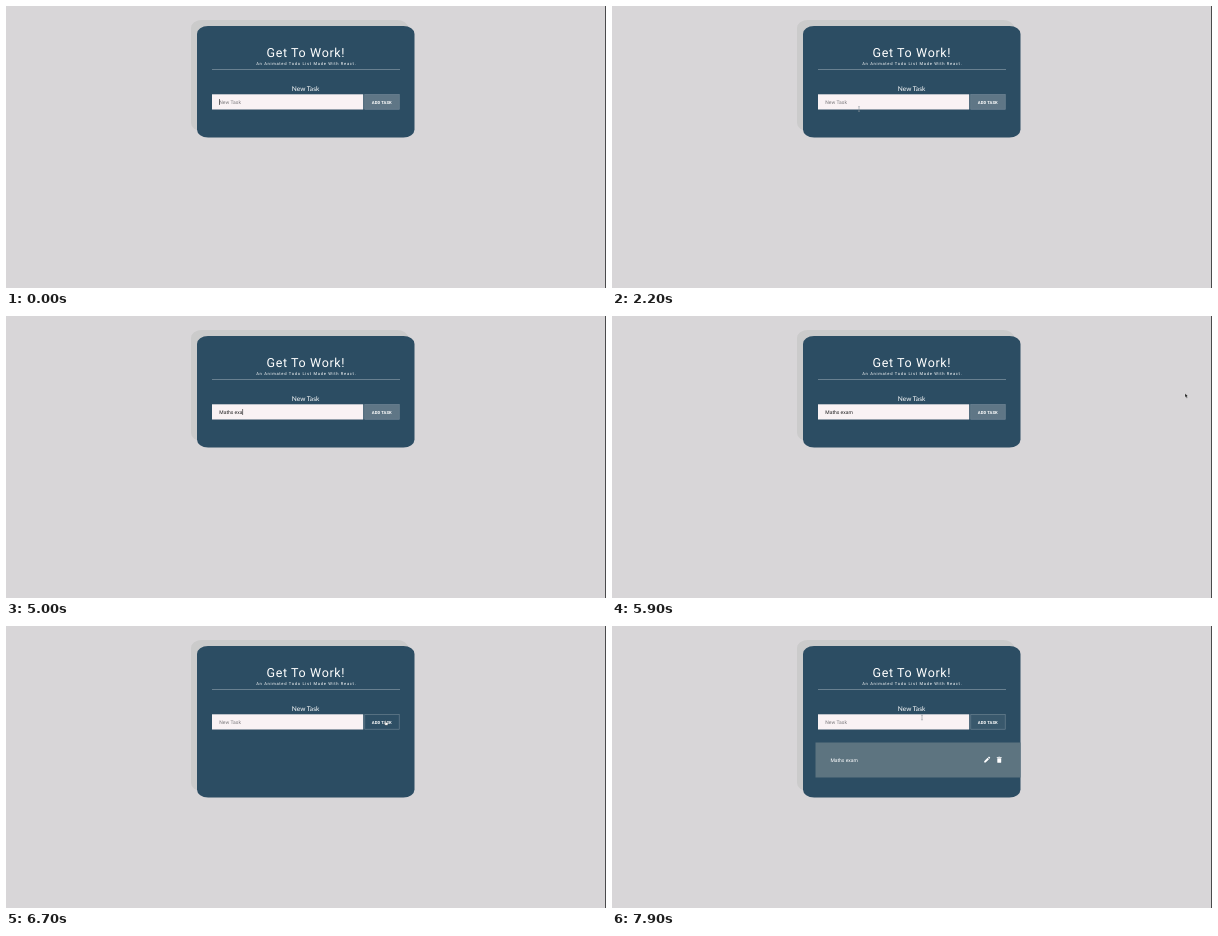
Animation of 600 by 282 pixels, one loop 8000 ms. Source, as an HTML page:

```html
<!DOCTYPE html>
<html lang="en">
<head>
<meta charset="utf-8">
<title>Todo list</title>
<style>
  html, body { margin: 0; width: 100%; height: 100%; overflow: hidden; background: #d8d6d8; }
  svg { display: block; width: 600px; height: 282px; }
  text { font-family: Roboto, sans-serif; fill: #fff; white-space: pre; text-rendering: geometricPrecision; }
  .mid { text-anchor: middle; }
  .title { font-size: 12.5px; letter-spacing: .63px; }
  .sub { font-size: 4.1px; letter-spacing: .68px; }
  .label { font-family: Lato, sans-serif; font-size: 6.6px; }
  .field { font-size: 5px; }
  .button { font-size: 4.2px; font-weight: 700; letter-spacing: .06px; }
</style>
</head>
<body>
<svg viewBox="0 0 600 282">
  <rect width="600" height="282" fill="#d8d6d8"/>
  <rect x="599" width="1" height="282" fill="#4b4b4d"/>
  <rect id="shadow" x="185" y="14" width="217" rx="11" ry="8" fill="#cbcbcb"/>
  <rect id="card" x="191" y="20" width="217.5" rx="11" ry="8" fill="#2c4d63"/>

  <text class="mid title" x="299.8" y="51.3">Get To Work!</text>
  <text class="mid sub" x="300.3" y="58.9">An Animated Todo List Made With React.</text>
  <rect x="206" y="63" width="188" height=".7" fill="#8397a4"/>
  <text class="mid label" x="299.6" y="84.9">New Task</text>

  <rect x="206" y="88.3" width="151.2" height="15.2" fill="#f9f2f4"/>
  <text id="value" class="field" x="213.3" y="97.6"></text>
  <rect id="caret" y="93" width=".6" height="6" fill="#222"/>

  <rect id="fill" x="358.5" y="88.3" width="35" height="15.2" fill="#5f7686"/>
  <rect x="358.8" y="88.6" width="34.4" height="14.6" fill="none" stroke="#718695" stroke-width=".6"/>
  <text class="mid button" x="375.8" y="97.5">ADD TASK</text>

  <g id="item">
    <rect x="203.5" y="116.5" width="205" height="35" fill="#5d7480"/>
    <text class="field" x="218.4" y="135.8">Maths exam</text>
    <path fill="#fff" d="M372.2 136.6v-1.4l3.4-3.4 1.4 1.4-3.4 3.4zM376 131.4l.7-.7q.3-.2.6 0l.8.8q.2.3 0 .6l-.7.7z"/>
    <path fill="#fff" d="M385.3 132.2h3.9v4q0 .6-.6.6h-2.7q-.6 0-.6-.6zM384.8 131.1h1.4l.4-.4h1.3l.4.4h1.4v.7h-4.9z"/>
  </g>

  <g id="pointer">
    <path id="arrow" d="M0 0v4l1-.9.7 1.6.8-.3-.7-1.6h1.3z" fill="#111" stroke="#fff" stroke-width=".3"/>
    <path id="beam" d="M-.9-2.5Q0-2.5 0-1.8V1.8Q0 2.5-.9 2.5M.9-2.5Q0-2.5 0-1.8M0 1.8Q0 2.5.9 2.5" fill="none" stroke="#8b969d" stroke-width=".6"/>
    <path id="hand" d="M-.6-2.2q.5-.6.9 0v1.5l1.6.4q.6.2.5.9l-.4 1.7h-2.4l-1.4-1.9q.2-.7 1.2.1z" fill="#fff" stroke="#17252e" stroke-width=".4"/>
  </g>
</svg>
<script>
const LOOP = 8000;
const $ = id => document.getElementById(id);
const show = (id, on) => $(id).setAttribute('visibility', on ? 'visible' : 'hidden');
const clamp = v => Math.max(0, Math.min(1, v));

// Last row whose time has been reached.
const at = (rows, t) => rows.filter(r => r[0] <= t).pop();

const typed = [
  [0, ''], [3000, 'M'], [3200, 'Ma'], [3400, 'M'], [3600, 'Mat'], [3800, 'Math'],
  [3900, 'Maths '], [4200, 'Maths e'], [4600, 'Maths ex'], [5000, 'Maths exa'],
  [5200, 'Maths exam'], [6700, '']
];
const caret = [
  [0, 1], [200, 0], [700, 1], [1200, 0], [1700, 1], [2200, 0], [2700, 1],
  [5700, 0], [6200, 1], [6700, 0]
];
const moves = [
  [0, 0, 0, ''], [700, 116, 12, 'arrow'], [800, 178, 42, 'arrow'],
  [900, 255, 76, 'arrow'], [1000, 308, 95, 'beam'], [1100, 324, 100, 'beam'],
  [1200, 272, 102, 'beam'], [1300, 247, 103, 'beam'], [3400, 0, 0, ''],
  [5700, 572, 76, 'arrow'], [5800, 573, 77.5, 'arrow'], [6000, 558, 80, 'arrow'],
  [6100, 515, 86, 'arrow'], [6200, 460, 92, 'arrow'], [6300, 412, 96, 'arrow'],
  [6400, 386, 97, 'hand'], [6500, 379.7, 97, 'hand'],
  [7800, 345, 95, 'beam'], [7900, 310, 91.5, 'beam']
];

function draw(t) {
  const text = at(typed, t)[1];
  const value = $('value');
  value.textContent = text || 'New Task';
  value.style.fill = text ? '#222' : '#7d7b7e';
  const width = text ? value.getComputedTextLength() : 0;
  $('caret').setAttribute('x', 213.3 + width);
  show('caret', at(caret, t)[1]);

  const grown = t >= 6700;
  $('card').setAttribute('height', grown ? 151.5 : 111.5);
  $('shadow').setAttribute('height', grown ? 151 : 111);
  $('item').setAttribute('opacity', clamp((t - 6800) / 500));

  const fade = t < 7000 ? 1 - clamp((t - 6300) / 300) : clamp((t - 7700) / 900);
  $('fill').setAttribute('opacity', .06 + .94 * fade);

  const [, x, y, shape] = at(moves, t);
  $('pointer').setAttribute('transform', `translate(${x} ${y})`);
  for (const id of ['arrow', 'beam', 'hand']) show(id, id === shape);
}

// The screen updates ten times a second.
const start = performance.now();
function tick() {
  const t = (performance.now() - start) % LOOP;
  draw(Math.floor(t / 100) * 100);
  requestAnimationFrame(tick);
}
tick();
</script>
</body>
</html>
```
